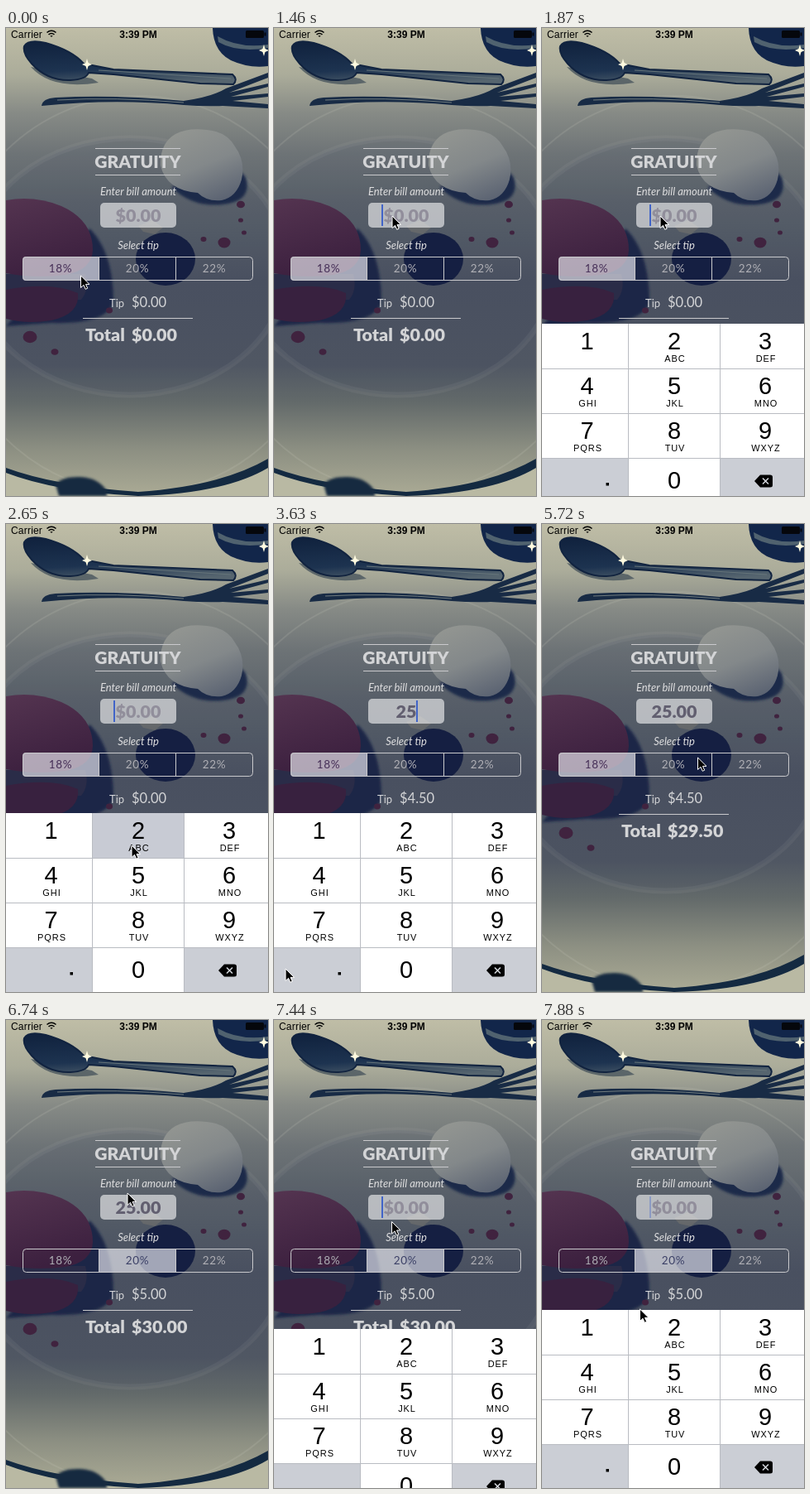
Write an HTML page that moves like this. It is 317 px wide and 565 px high and loops after 8 s.

```html
<!DOCTYPE html>
<html lang="en">
<head>
<meta charset="utf-8">
<title>Tip calculator</title>
<style>
  html, body { margin: 0; width: 100%; height: 100%; overflow: hidden; background: #555a69; }
  svg { display: block; width: 100vw; height: 100vh; }
  text { font-family: Lato, sans-serif; fill: #d3d4d6; white-space: pre; }
  .heavy { font-weight: 900; font-size: 21.5px; }
  .label { font-style: italic; font-size: 13px; fill: #dededf; }
  .mid { text-anchor: middle; }
  .seg { font-size: 13.5px; letter-spacing: .6px; }
  .status { font: 12px "Liberation Sans", Arial, sans-serif; fill: #000; }
  .digit { font: 29px "Liberation Sans", Arial, sans-serif; fill: #000; }
  .letters { font: 11px "Liberation Sans", Arial, sans-serif; letter-spacing: .9px; fill: #000; }
  .rule { stroke: #c9c9cc; fill: none; }
</style>
</head>
<body>
<svg viewBox="0 0 317 565" preserveAspectRatio="none">
  <defs>
    <linearGradient id="cloth" x2="0" y2="1">
      <stop offset="0" stop-color="#bfbda6"/>
      <stop offset=".1" stop-color="#abac9a"/>
      <stop offset=".18" stop-color="#878b86"/>
      <stop offset=".27" stop-color="#6d7376"/>
      <stop offset=".37" stop-color="#5d646b"/>
      <stop offset=".54" stop-color="#4d5462"/>
      <stop offset=".72" stop-color="#505763"/>
      <stop offset=".8" stop-color="#636a6a"/>
      <stop offset=".9" stop-color="#8c8f82"/>
      <stop offset="1" stop-color="#abab95"/>
    </linearGradient>
    <linearGradient id="steel" x1=".3" x2=".6" y2="1">
      <stop offset="0" stop-color="#11233f"/>
      <stop offset=".6" stop-color="#1d3350"/>
      <stop offset="1" stop-color="#56656f"/>
    </linearGradient>
    <linearGradient id="scoop" x1=".3" x2=".75" y2="1">
      <stop offset="0" stop-color="#929591"/>
      <stop offset=".5" stop-color="#83888a"/>
      <stop offset="1" stop-color="#5b6372"/>
    </linearGradient>
    <linearGradient id="shell" x2=".3" y2="1">
      <stop offset="0" stop-color="#543450"/>
      <stop offset="1" stop-color="#3c203f"/>
    </linearGradient>
    <filter id="soft"><feGaussianBlur stdDeviation="1.5"/></filter>
    <clipPath id="pill"><rect x="20" y="276" width="279" height="29" rx="4"/></clipPath>
  </defs>

  <rect width="317" height="565" fill="url(#cloth)"/>

  <!-- plate -->
  <ellipse cx="160" cy="322" rx="232" ry="240" fill="none" stroke="#d0d0c4" stroke-opacity=".14" stroke-width="2"/>
  <ellipse cx="150" cy="288" rx="190" ry="155" fill="#20294a" fill-opacity=".08" stroke="#b9bcc0" stroke-opacity=".08" stroke-width="7"/>
  <path d="M0 535Q60 558 160 563Q260 560 317 527V565H0Z" fill="#b9b9a3"/>
  <path d="M0 531Q60 553 160 560Q260 553 317 520V531Q265 562 160 565Q60 560 0 537Z" fill="#142a41"/>
  <path d="M60 551Q68 541 90 542T122 559V565H64Z" fill="#142a41" filter="url(#soft)"/>

  <!-- glass and cutlery -->
  <path d="M250 0Q251 28 272 39Q294 49 317 46V0Z" fill="#12264a"/>
  <path d="M256 10Q282 25 317 20V24Q280 30 257 17Z" fill="#50626f"/>
  <path d="M30 47Q55 75 112 66L104 61Z" fill="#3d4a56" fill-opacity=".7"/>
  <path d="M22 22Q27 13 48 18Q80 27 94 43L130 50L274 56Q281 62 275 68L235 67L130 56L100 54Q97 62 78 63Q50 64 31 43Q20 31 22 22Z" fill="url(#steel)" stroke="#11233f" stroke-width="2"/>
  <path d="M112 51L272 61" stroke="#66757a"/>
  <path d="M43 94Q44 85 60 84Q130 80 215 88Q250 83 266 73L317 54V60L270 78L317 67V71L272 83L317 79V83L274 88L317 92V97L262 94Q240 95 215 93Q130 85 43 94Z" fill="#182b45"/>
  <path d="M62 87Q130 83 215 90" fill="none" stroke="#6f7b7e"/>
  <g fill="#fffbe0">
    <path id="spark" d="M98 37L99.500 42 104 44 99.500 46 98 51 96.500 46 92 44 96.500 42Z"/>
    <use href="#spark" x="214" y="-17"/>
  </g>

  <!-- dessert -->
  <path d="M200 192Q225 217 262 213T290 180Q275 160 250 180Z" fill="#1d2a4a" filter="url(#soft)"/>
  <path d="M187 166Q186 139 205 128Q220 120 243 123Q267 125 277 143Q290 161 285 183Q279 204 261 208Q243 210 232 199Q194 196 187 166Z" fill="url(#scoop)"/>
  <path d="M0 360L55 356Q120 358 130 332Q130 270 101 242L60 290Z" fill="#1b2747" filter="url(#soft)"/>
  <path d="M0 297H96Q101 316 91 328L0 331Z" fill="#2a2c48"/>
  <path d="M0 316Q55 306 87 320Q90 345 55 353Q25 358 0 351Z" fill="#38213f"/>
  <path d="M0 208Q35 202 67 215Q105 232 105 268Q104 292 72 298Q35 303 0 296Z" fill="url(#shell)"/>
  <ellipse cx="193" cy="279" rx="36" ry="32" fill="#151f42"/>
  <path d="M160 239L177 232 190 241 180 249 166 246Z" fill="#77766f" fill-opacity=".5"/>
  <g id="drops" fill="#40233f"></g>

  <!-- status bar -->
  <text class="status" x="6" y="11.500" letter-spacing=".2">Carrier</text>
  <g fill="none" stroke="#000" stroke-width="1.600">
    <path d="M49.500 5.500Q55 1 60.500 5.500M51.500 8Q55 5 58.500 8"/>
    <path d="M53.300 9.300H56.700L55 11Z" fill="#000" stroke="none"/>
  </g>
  <text class="status mid" x="160" y="11.500" style="font-weight:700">3:39 PM</text>
  <rect x="290" y="3" width="22" height="9" rx="1.500" fill="#05070c"/>
  <rect x="312.500" y="5.500" width="2" height="4" fill="#05070c"/>

  <!-- form -->
  <path class="rule" d="M108 145.500H211M108 177.500H211M93 350.500H226"/>
  <text class="heavy mid" x="159.500" y="169" style="font-size:21px">GRATUITY</text>
  <text class="label mid" x="160" y="202">Enter bill amount</text>
  <rect x="114" y="211" width="92" height="30" rx="5" fill="#fff" fill-opacity=".58"/>
  <text id="bill" class="heavy mid" x="160" y="234"></text>
  <rect id="caret" y="213" width="2" height="26" fill="#4164c8"/>
  <text class="label mid" x="160" y="267">Select tip</text>
  <rect id="chosen" y="276" width="93" height="29" fill="#f8f8ff" fill-opacity=".62" clip-path="url(#pill)"/>
  <rect class="rule" x="20.500" y="276.500" width="278" height="28" rx="4"/>
  <path class="rule" d="M112.500 277V304M205.500 277V304"/>
  <g id="segments"></g>
  <text x="125" y="337" font-size="13">Tip</text>
  <text id="tip" x="152" y="337" font-size="16.500"></text>
  <text class="heavy" x="96" y="378">Total</text>
  <text id="total" class="heavy" x="152" y="378"></text>

  <g id="keyboard"></g>
  <path id="cursor" d="M0 0V14.500L3.500 11.300 5.700 16.300 8.200 15.200 6 10.400H10.500Z" fill="#000" stroke="#fff"/>
</svg>

<script>
const LOOP = 8000, STEP = LOOP / 55;
const FIRST_TAP = 10, DISMISS = 34, PICK = 42, SECOND_TAP = 48;
const RATES = [18, 20, 22];
const $ = id => document.getElementById(id);

// Cursor stops: step, x, y
const PATH = [
  [0, 90.5, 299], [5, 143, 227], [13, 143, 227], [17, 152, 388], [19, 152, 388],
  [21, 152, 438], [23, 152, 438], [25, 14, 537], [26, 14, 537], [28, 134.5, 539],
  [30, 134.5, 539], [33, 228, 322], [35, 228, 322], [39, 188.5, 282], [45, 188.5, 284],
  [46, 147, 209], [47, 147, 224], [50, 147, 224], [54, 118.5, 349]
];
const TYPED = [[0, ''], [19, '2'], [23, '25'], [27, '25.'], [29, '25.0'], [30, '25.00'], [SECOND_TAP, '']];
const PRESSED = { 18: 2, 22: 5, 28: 0, 29: 0 };

// Sauce drops around the dessert: x, y, radius
$('drops').innerHTML = [
  [264, 259, 7.5], [284, 232, 3], [288, 247, 3], [239, 255, 3.5], [284, 213, 5],
  [29, 373, 8.5], [59, 391, 4.5], [125, 341, 4]
].map(([x, y, r]) => `<ellipse cx="${x}" cy="${y}" rx="${r}" ry="${r * .85}"/>`).join('');

$('segments').innerHTML = RATES.map((rate, i) =>
  `<text class="seg mid" x="${66 + 93 * i}" y="295">${rate}%</text>`).join('');

function buildKeyboard() {
  const lefts = [0, 105, 216, 317], centres = [54.5, 160, 270];
  const letters = ['', 'ABC', 'DEF', 'GHI', 'JKL', 'MNO', 'PQRS', 'TUV', 'WXYZ'];
  const key = (digit, col, row, label) => `
    <rect id="key${digit}" x="${lefts[col]}" y="${row * 54}" width="${lefts[col + 1] - lefts[col]}" height="54"/>
    <text class="digit mid" x="${centres[col]}" y="${row * 54 + (row < 3 ? 30.5 : 37)}">${digit}</text>
    <text class="letters mid" x="${centres[col] + 1}" y="${row * 54 + 45.5}">${label}</text>`;
  const keys = letters.map((label, i) => key(i + 1, i % 3, Math.floor(i / 3), label)).join('');
  return `<rect width="317" height="217" fill="#cbced5"/>${keys}${key(0, 1, 3, '')}
    <path d="M0 54.500H317M0 108.500H317M0 162.500H317M104.500 0V216M215.500 0V216" stroke="#b9bcc2"/>
    <rect x="77.500" y="192" width="3.500" height="3.500"/>
    <path d="M257 190L264 182.500H276Q279 182.500 279 185V195Q279 197.500 276 197.500H264Z"/>
    <path d="M267 186.500L274 193.500M274 186.500L267 193.500" stroke="#d5d8de" stroke-width="1.500"/>`;
}
$('keyboard').innerHTML = buildKeyboard();

function cursorAt(step) {
  const i = Math.max(1, PATH.findIndex(p => p[0] >= step));
  const [s0, x0, y0] = PATH[i - 1], [s1, x1, y1] = PATH[i];
  const u = (step - s0) / (s1 - s0), e = u * u * (3 - 2 * u);
  return [x0 + (x1 - x0) * e, y0 + (y1 - y0) * e];
}

function keyboardTop(step) {
  const settle = since => Math.exp(-7.6 * (step - since) * STEP / 1000);
  if (step > SECOND_TAP) return 349 + Math.round(216 * settle(SECOND_TAP + 1));
  if (step >= DISMISS) return 565 - Math.floor(216 * settle(DISMISS));
  return step < FIRST_TAP ? 565 : 349 + Math.round(216 * settle(FIRST_TAP));
}

function caretAlpha(seconds) {
  const phase = seconds % 1;
  if (phase < .5) return 1;
  return phase < .8 ? Math.max(0, 1 - (phase - .5) * 6) : (phase - .8) * 5;
}

function draw(step) {
  const latest = TYPED.findLast(entry => entry[0] <= step);
  const value = latest[1];
  const editing = step >= FIRST_TAP && step < DISMISS || step >= SECOND_TAP;
  const amount = step >= SECOND_TAP ? 25 : Number(value);
  const choice = step < PICK ? 0 : 1;
  const tip = amount * RATES[choice] / 100;

  const bill = $('bill');
  bill.textContent = value || '$0.00';
  bill.style.fill = value ? '#625f70' : '#918e9b';
  const half = bill.getComputedTextLength() / 2;
  $('caret').setAttribute('x', value ? 160 + half - .5 : 130);
  const since = Math.max(latest[0], FIRST_TAP);
  $('caret').style.opacity = editing ? caretAlpha((step - since) * STEP / 1000) : 0;

  $('chosen').setAttribute('x', 20 + 92.5 * choice);
  [...$('segments').children].forEach((label, i) => {
    label.style.fill = i !== choice ? '#b0b0b6' : i ? '#3c4167' : '#462f57';
  });
  $('tip').textContent = '$' + tip.toFixed(2);
  $('total').textContent = '$' + (amount + tip).toFixed(2);

  $('keyboard').setAttribute('transform', `translate(0 ${keyboardTop(step)})`);
  for (let digit = 0; digit < 10; digit++) {
    $('key' + digit).style.fill = PRESSED[step] === digit ? '#c8cbd4' : '#fff';
  }
  $('cursor').setAttribute('transform', `translate(${cursorAt(step)})`);
}

const start = performance.now();
function tick() {
  const time = (performance.now() - start) % LOOP;
  draw(Math.min(54, Math.floor((time + 25) / STEP)));
  requestAnimationFrame(tick);
}
tick();
</script>
</body>
</html>
```
